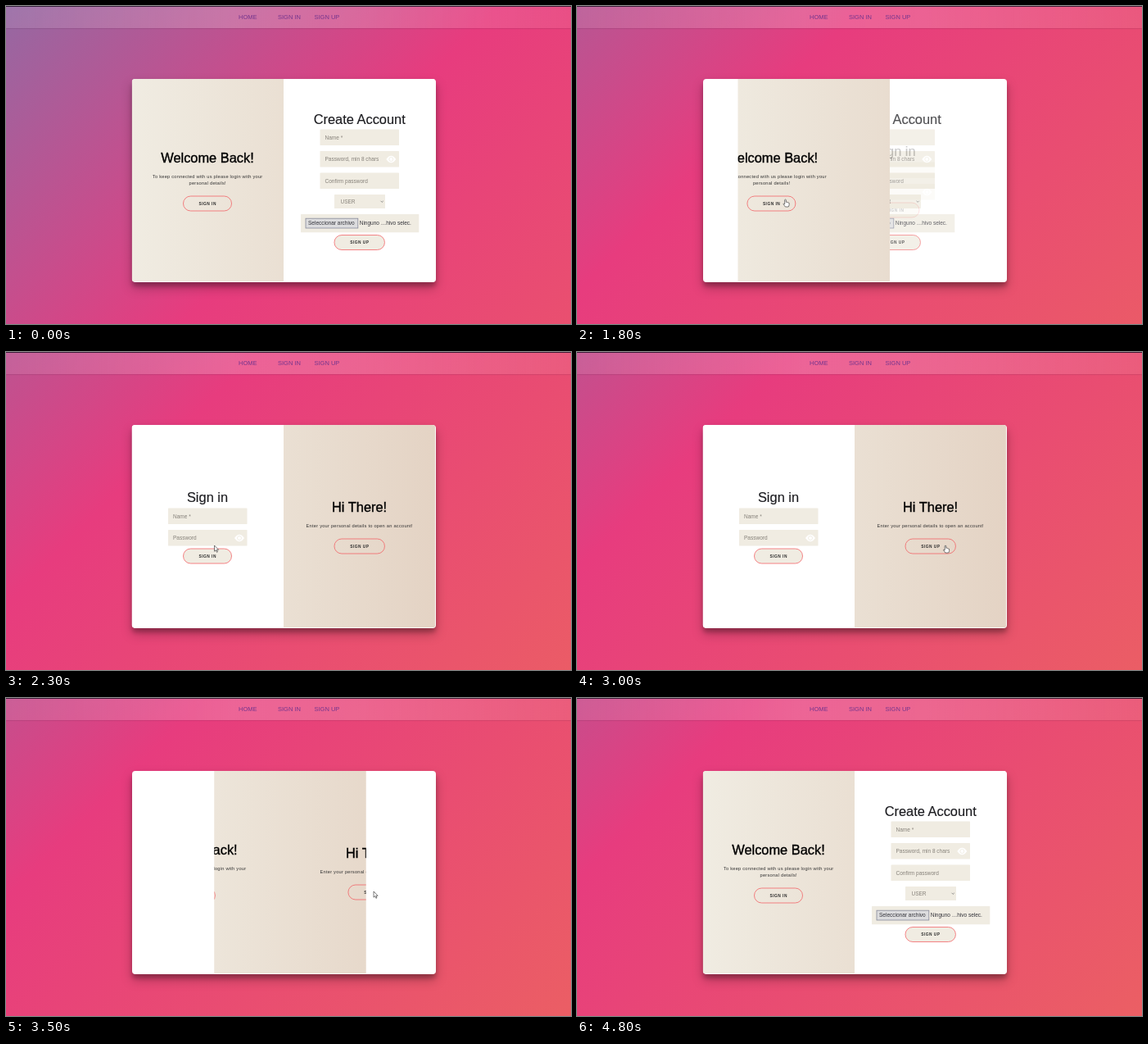
Recreate the animation shown at these times as an HTML page. Size 690 by 388 pixels, loop 4.9 s.

```html
<!DOCTYPE html>
<html lang="en">
<head>
<meta charset="utf-8">
<title>Sliding sign-in panels</title>
<style>
  html, body { margin: 0; width: 100%; height: 100%; overflow: hidden; }
  #stage {
    position: relative; width: 690px; height: 388px; overflow: hidden;
    background: linear-gradient(-45deg, #ee7752, #e73c7e, #23a6d5, #23d5ab) 0 50% / 400% 400%;
  }
  #nav {
    position: absolute; left: 0; top: 0; width: 690px; height: 27px; box-sizing: border-box;
    border-top: 1px solid rgba(35, 18, 40, .85);
    background: linear-gradient(to right, rgba(255,255,255,.09), rgba(255,255,255,.2) 40%, rgba(255,255,255,.18) 62%, rgba(255,255,255,.08));
    box-shadow: 0 .5px 1.5px rgba(60, 10, 50, .3);
  }
  #card {
    position: absolute; left: 153.5px; top: 89px; width: 371px; height: 247.5px;
    border-radius: 4px; background: #fff;
    box-shadow: 0 7px 14px rgba(0,0,0,.25), 0 5px 5px rgba(0,0,0,.22);
  }
  svg { position: absolute; left: 0; top: 0; }
  text { font-family: "Liberation Sans", Arial, sans-serif; white-space: pre; }
  .link { font-size: 7.5px; fill: #74358d; }
  .title { font-size: 16.4px; text-anchor: middle; fill: #1c1c20; stroke: #1c1c20; stroke-width: .15px; }
  .strong { fill: #000; stroke: #000; stroke-width: .35px; }
  .para { font-size: 5.7px; letter-spacing: .235px; text-anchor: middle; fill: #333; }
  .label { font-size: 4.83px; font-weight: bold; letter-spacing: .483px; text-anchor: middle; fill: #2b2b2b; }
  .hint { font-size: 6.5px; fill: #858079; }
  .dark { fill: #33333a; }
  .box { fill: #f0ece2; }
  .pill { fill: #f0ece2; stroke: #f25c60; stroke-width: .75px; }
  .ghost { fill: none; }
</style>
</head>
<body>
<div id="stage">
  <div id="nav"></div>
  <div id="card"></div>
  <svg width="690" height="388" viewBox="0 0 690 388">
    <defs>
      <clipPath id="cardClip"><rect x="153.5" y="89" width="371" height="247.5" rx="4"/></clipPath>
      <clipPath id="paneClip"><rect id="pane" y="89" width="185.5" height="247.5"/></clipPath>
      <linearGradient id="sand">
        <stop offset="0" stop-color="#f0ece2"/>
        <stop offset="1" stop-color="#e4d3c4"/>
      </linearGradient>
    </defs>
    <text class="link" x="284" y="16">HOME</text>
    <text class="link" x="332" y="16">SIGN IN</text>
    <text class="link" x="376.5" y="16">SIGN UP</text>
    <g clip-path="url(#cardClip)">
      <g id="signIn"></g>
      <g id="signUp"></g>
      <g clip-path="url(#paneClip)">
        <rect x="153.5" y="89" width="371" height="247.5" fill="url(#sand)"/>
        <g id="welcome"></g>
        <g id="hello"></g>
      </g>
    </g>
    <path id="arrow" d="M0 0V7.2L1.7 5.7L2.9 8.3L4 7.8L2.9 5.3H5.1Z" fill="#fff" stroke="#222" stroke-width=".6"/>
    <path id="hand" d="M-.8 .6Q0-.5 .8 .6V3.3Q1.6 2.7 2.2 3.6Q3 3.1 3.5 4Q4.5 3.7 4.6 4.8V6.6Q4.4 8 3.7 9H-.1Q-1.2 7.5-2.5 5.6Q-2.4 4.5-.8 5.7Z" fill="#fff" stroke="#222" stroke-width=".6"/>
  </svg>
</div>
<script>
const LOOP = 4900, STEP = 100, HALF = 185.5, LEFT = 153.5;
const SLIDE = 600, TO_SIGN_IN = 1600, TO_SIGN_UP = 3215;
const $ = id => document.getElementById(id);

const text = (cls, x, y, s) => `<text class="${cls}" x="${x}" y="${y}">${s}</text>`;
const box = (x, y, w, h) => `<rect class="box" x="${x}" y="${y}" width="${w}" height="${h}" rx=".6"/>`;
const field = (x, y, s) => box(x, y, 96.5, 19.5) + text('hint', x + 6, y + 12.1, s);
const pill = (cx, y, w, s, cls = '') =>
  `<rect class="pill ${cls}" x="${cx - w / 2}" y="${y}" width="${w}" height="18" rx="9"/>` +
  text('label', cx + .2, y + 10.8, s);
const eye = (x, y) =>
  `<g transform="translate(${x} ${y})"><path d="M-6 0Q0-8.5 6 0Q0 8.5-6 0Z" fill="#fff"/>` +
  `<circle r="2.5" fill="none" stroke="#f0ece2" stroke-width=".9"/></g>`;
const sheet = x => `<rect x="${x}" y="89" width="${HALF}" height="247.5" fill="#fff"/>`;

$('signIn').innerHTML = sheet(LEFT) +
  text('title', 246, 183, 'Sign in') +
  field(198, 190.5, 'Name *') + field(198, 217, 'Password') + eye(285, 227) +
  pill(246, 240, 59, 'SIGN IN');

$('signUp').innerHTML = sheet(LEFT + HALF) +
  text('title', 431.7, 143.5, 'Create Account') +
  field(383.5, 150.5, 'Name *') + field(383.5, 177, 'Password, min 8 chars') + eye(470.3, 187) +
  field(383.5, 203.5, 'Confirm password') +
  box(401, 230, 62, 17) + text('hint', 408.5, 241, 'USER') +
  '<path d="M457.6 237.8L459.2 239.4L460.8 237.8" fill="none" stroke="#777" stroke-width=".8"/>' +
  box(360, 254, 144.3, 22.3) +
  '<rect x="366" y="259.2" width="63.8" height="11.8" fill="#dcdcde" stroke="#85889a" stroke-width=".8"/>' +
  text('hint dark', 369, 267.4, 'Seleccionar archivo') +
  text('hint dark', 431.7, 267.4, 'Ninguno …hivo selec.') +
  pill(431.7, 279.5, 61.5, 'SIGN UP');

$('welcome').innerHTML =
  text('title strong', 246, 191, 'Welcome Back!') +
  text('para', 246.2, 209.6, 'To keep connected with us please login with your') +
  text('para', 246.2, 217.8, 'personal details!') +
  pill(246, 232, 59, 'SIGN IN', 'ghost');

$('hello').innerHTML =
  text('title strong', 431.6, 195, 'Hi There!') +
  text('para', 431.7, 213.6, 'Enter your personal details to open an account!') +
  pill(431.7, 228, 61.5, 'SIGN UP', 'ghost');

const clamp = v => Math.min(1, Math.max(0, v));

function bezier(x1, y1, x2, y2) {
  const at = (a, b, u) => 3 * a * u * (1 - u) ** 2 + 3 * b * u * u * (1 - u) + u ** 3;
  return x => {
    if (x <= 0 || x >= 1) return clamp(x);
    let lo = 0, hi = 1;
    for (let i = 0; i < 30; i++) {
      const mid = (lo + hi) / 2;
      if (at(x1, x2, mid) < x) lo = mid; else hi = mid;
    }
    return at(y1, y2, lo);
  };
}
const ease = bezier(.25, .1, .25, 1);
const easeInOut = bezier(.42, 0, .58, 1);

// time, x, y, pointer shape from this time on
const path = [
  [1400, 238, 300, 'arrow'], [1500, 252, 246, 'hand'], [1600, 254.5, 236, 'hand'],
  [2300, 254.5, 236, 'arrow'], [2700, 446, 238, 'hand'], [2900, 450, 236, 'hand'],
  [3300, 450, 236, 'arrow'], [3500, 449, 236, 'arrow'], [3800, 219, 282, 'arrow'],
  [3900, 195, 322, 'arrow'], [4000, 180, 336, '']
];

const move = (id, x, y = 0) => $(id).setAttribute('transform', `translate(${x} ${y})`);

function drawPointer(t) {
  let i = -1;
  while (i + 1 < path.length && path[i + 1][0] <= t) i++;
  const a = path[i], b = path[i + 1];
  const shape = a && b ? a[3] : '';
  for (const id of ['arrow', 'hand']) $(id).style.display = id === shape ? '' : 'none';
  if (!shape) return;
  const k = easeInOut((t - a[0]) / (b[0] - a[0]));
  move(shape, a[1] + (b[1] - a[1]) * k, a[2] + (b[2] - a[2]) * k);
}

function draw(t) {
  $('stage').style.backgroundPosition = `${100 * ease(.515 + t / 10000)}% 50%`;

  // active = 1 shows the sign-up form, 0 the sign-in form
  const opening = t >= TO_SIGN_UP;
  const part = clamp((t - (opening ? TO_SIGN_UP : TO_SIGN_IN)) / SLIDE);
  const active = opening ? easeInOut(part) : 1 - easeInOut(part);

  $('pane').setAttribute('x', LEFT + HALF * (1 - active));
  move('signIn', HALF * active);
  move('signUp', HALF * (active - 1));
  move('welcome', -.2 * HALF * (1 - active));
  move('hello', .2 * HALF * active);
  $('signUp').setAttribute('opacity', opening ? +(part >= .5) : active > .375 ? active : 0);

  drawPointer(t);
}

const start = performance.now();
function tick() {
  const t = (performance.now() - start) % LOOP;
  draw(Math.floor(t / STEP) * STEP);
  requestAnimationFrame(tick);
}
tick();
</script>
</body>
</html>
```
